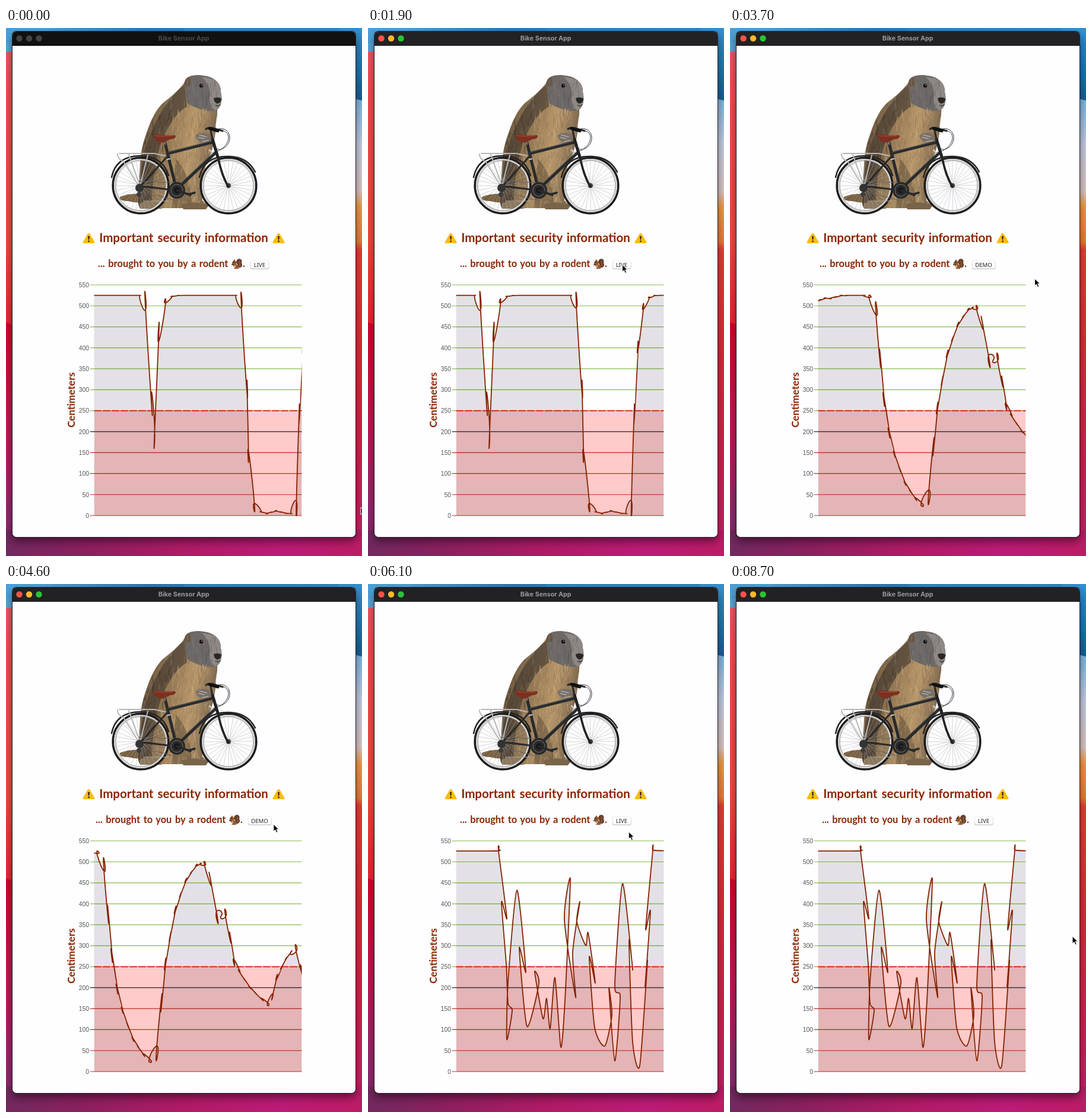
An HTML page that plays this animation: 600 px wide and 888 px high, repeating every 8800 ms.

```html
<!DOCTYPE html>
<html lang="en">
<head>
<meta charset="utf-8">
<title>Bike Sensor App</title>
<style>
html, body { margin: 0; width: 100%; height: 100%; overflow: hidden; background: #b21c63; }
svg { display: block; width: 100vw; height: 100vh; }
.head { font-family: Lato, sans-serif; font-weight: 700; fill: #8b2500; word-spacing: .1em; }
.axis { font: 10.3px "Liberation Sans", Arial, sans-serif; fill: #555; text-anchor: end; }
.bar { font: 700 10.7px Inter, sans-serif; text-anchor: middle; }
.btn { font: 9.6px "Noto Sans", sans-serif; text-anchor: middle; }
.ln { fill: none; stroke-linecap: round; stroke-linejoin: round; }
</style>
</head>
<body>
<svg id="stage" viewBox="0 0 600 888" preserveAspectRatio="none" xmlns="http://www.w3.org/2000/svg"></svg>
<script>
const LOOP = 8800, LEFT = 149, RIGHT = 498, BASE = 820, CM = 388 / 550, STEP = 9;
const yOf = cm => BASE - cm * CM;
const parse = s => s.trim().split(/\s+/).map(p => p.split(',').map(Number));

let seed = 7;
const rnd = () => (seed = seed * 16807 % 2147483647) / 2147483647;

// Spline with tangent factor k; a negative k makes the line loop back at each point
function spline(pts, k) {
  const tan = i => {
    const a = pts[Math.max(0, i - 1)], b = pts[Math.min(pts.length - 1, i + 1)];
    return [(b[0] - a[0]) * k, (b[1] - a[1]) * k];
  };
  const f = v => v.toFixed(1);
  let d = `M${f(pts[0][0])} ${f(pts[0][1])}`;
  for (let i = 1; i < pts.length; i++) {
    const [p, q, a, b] = [pts[i - 1], pts[i], tan(i - 1), tan(i)];
    d += `C${f(p[0] + a[0])} ${f(p[1] + a[1])} ${f(q[0] - b[0])} ${f(q[1] - b[1])} ${f(q[0])} ${f(q[1])}`;
  }
  return d;
}

function curve(pts, k) {
  const line = spline(pts, k);
  return { line, area: `${line}V${BASE}H${pts[0][0]}Z` };
}

// Readings as x, centimetres; wide gaps are filled at the sensor's pace
function readings(s, k) {
  const knots = parse(s), out = [knots[0]];
  for (let i = 1; i < knots.length; i++) {
    const [a, b] = [knots[i - 1], knots[i]], n = Math.max(1, Math.round((b[0] - a[0]) / STEP));
    for (let j = 1; j <= n; j++) out.push([a[0] + (b[0] - a[0]) * j / n, a[1] + (b[1] - a[1]) * j / n]);
  }
  return curve(out.map(([x, v]) => [x, yOf(v)]), k);
}

const live = readings(`100,525 235,525 246,255 250,165 257,445 268,515 279,523 290,525 397,525 407,300
  408,140 418,13 440,4 455,12 472,5 490,4 494,245 500,405 509,502 519,521 528,525 620,525`, -.3);

const demo = readings(`61,240 79,375 97,443 115,480 133,500 151,514 160,519 169,517 187,525 236,525
  247,500 253,375 259,275 268,195 277,145 295,76 313,39 324,22 336,35 343,165 349,258 366,387 384,457
  402,493 416,500 425,463 437,358 451,385 459,320 465,258 492,200 523,157 530,176 537,226 553,270
  570,301 588,185 617,126 638,258 652,180 669,140`, -.45);

// The ride shown at rest, in stage pixels
const still = curve(parse(`100,449 215,449 220,446 221,442 220,449 234,562 225,535 233,640 236,705 243,717
  234,766 236,670 251,515 266,652 255,612 268,744 288,672 281,653 295,731 301,697 307,748 315,662 325,779
  332,700 341,497 331,565 350,695 345,620 357,535 352,568 367,608 371,587 383,671 373,627 382,746 399,777
  411,725 406,680 416,802 425,694 416,675 429,504 446,648 440,600 446,770 458,810 471,635 467,677
  476,550 468,580 480,448 480,442 483,448 530,449`), .12);

const el = (tag, attrs, body = '') =>
  `<${tag} ${Object.entries(attrs).map(([k, v]) => `${k}="${v}"`).join(' ')}>${body}</${tag}>`;
const shape = (d, fill, more = {}) => el('path', { d, fill, ...more });
const line = (d, stroke, w, more = {}) => el('path', { d, stroke, 'stroke-width': w, class: 'ln', ...more });
const disc = (cx, cy, r, fill) => el('circle', { cx, cy, r, fill });
const ring = (cx, cy, r, stroke, w) => el('circle', { cx, cy, r, stroke, 'stroke-width': w, fill: 'none' });
const rect = (x, y, width, height, fill, more = {}) => el('rect', { x, y, width, height, fill, ...more });
const text = (x, y, cls, body, more = {}) => el('text', { x, y, class: cls, ...more }, body);
const grad = (id, dir, stops) => el('linearGradient', { id, ...dir },
  stops.map(([offset, c]) => el('stop', { offset, 'stop-color': c })).join(''));
const DOWN = { x1: 0, y1: 0, x2: 0, y2: 1 }, ACROSS = { x1: 0, y1: 0, x2: 1, y2: 0 };

const bodyD = `M301 91C303 79 321 77 338 81C353 84 363 95 362 108C365 119 363 132 356 137C357 151 352 160 354 172
  C350 190 349 208 340 222C332 240 330 270 331 290L341 299Q337 306 310 303L226 303Q220 296 224 270
  C226 235 225 212 233 188C241 163 250 138 267 124C281 113 292 104 301 91Z`;

function wallpaper() {
  return rect(0, 0, 600, 888, 'url(#left)') +
    rect(0, 0, 600, 40, 'url(#top)') +
    shape('M0 0H80L0 26Z', '#4b9fd6') +
    rect(300, 0, 300, 888, 'url(#right)') +
    shape('M560 0H600V122L560 112Z', 'url(#blue)') +
    shape('M0 495L40 510V888H0Z', 'url(#low)') +
    rect(0, 845, 600, 43, 'url(#foot)');
}

function fur() {
  let out = '';
  for (let i = 0; i < 620; i++) {
    const x = 218 + rnd() * 140, y = 82 + rnd() * 220, len = 4 + rnd() * 9, lean = (rnd() - .6) * 5;
    const back = x < 292 - (y - 110) * .3;
    const tones = y < 130 ? ['#4a494a', '#858381', '#625e5b'] :
      back ? ['#3e342b', '#80705a', '#25201d'] : ['#c4a77c', '#79634a', '#e0c99e'];
    out += line(`M${x.toFixed(1)} ${y.toFixed(1)}l${lean.toFixed(1)} ${len.toFixed(1)}`,
      tones[i % 3], .8, { opacity: .55 });
  }
  return out;
}

function marmot() {
  return shape('M232 279Q205 278 192 284Q190 291 205 291Q220 295 235 293Z', '#78603f') +
    shape(bodyD, 'url(#coat)') +
    el('g', { 'clip-path': 'url(#body)' },
      shape('M301 95Q264 125 243 180Q225 225 222 303H245Q246 240 262 190Q282 145 305 132Z', '#443a31', { opacity: .65 }) +
      shape('M298 78H370V138Q332 144 305 126Z', '#6c6967') +
      shape('M330 82Q345 98 344 113Q340 125 352 139L370 130V90Z', '#8e8984') +
      shape('M303 84Q312 79 311 96Q305 100 300 96Z', '#6b5540') +
      shape('M286 220Q312 245 313 303H280Z', '#4d3e2f', { opacity: .45 }) + fur()) +
    disc(329, 97, 3.2, '#171413') + disc(330, 96, .8, '#ddd') +
    shape('M350 118Q359 115 363 119Q363 126 356 127Q351 126 350 118Z', '#292626') +
    line('M353 130Q358 132 361 129', '#3c3431', 1.2) +
    shape('M319 181Q327 174 341 178L345 184Q341 194 329 192Q320 188 319 181Z', '#77706a') +
    line('M324 184l10 2M326 180l12 3M331 191l10-2', '#b6aba0', 1.5) +
    shape('M225 296Q238 286 259 298L263 304H226Z', '#8c785c') +
    shape('M295 297Q320 289 341 299L337 305H299Z', '#796449');
}

function wheel(cx) {
  let spokes = '';
  for (let i = 0; i < 32; i++) {
    const a = i * Math.PI / 16, b = a + (i % 2 ? .16 : -.16);
    spokes += `M${cx + 4 * Math.cos(b)} ${265 + 4 * Math.sin(b)}L${cx + 43 * Math.cos(a)} ${265 + 43 * Math.sin(a)}`;
  }
  return line(spokes, '#aaa', .5) + ring(cx, 265, 46.8, '#1d1c1c', 3.6) +
    ring(cx, 265, 43.7, '#d3d3d3', 2.5) + ring(cx, 265, 42, '#77736f', .7) + disc(cx, 265, 4, '#444');
}

function bike() {
  return wheel(227) + wheel(375) +
    line('M178 251Q185 216 225 215Q264 215 274 248M326 251Q334 214 377 216Q407 217 420 242', '#252424', 2.5) +
    line('M191 211H250M188 212Q187 219 199 226L224 266M207 213L225 263M239 214L226 265M250 211L268 215', '#b7b7b5', 2) +
    line('M227 266L287 273M227 266L271 217', '#292929', 3) +
    line('M268 193L287 271M272 211L348 192M288 271L354 209', '#292b2c', 5) +
    line('M273 209L348 190M290 265L350 208', '#606466', .8) +
    line('M348 187L357 217', '#202122', 5) + line('M357 215Q363 248 375 267', '#222324', 3.7) +
    line('M348 187L345 173M337 170Q343 165 354 170L365 173', '#282828', 3.2) +
    line('M343 169L357 173', '#111', 5) +
    line('M356 170C379 164 384 192 367 202C358 207 354 203 351 198M361 172C384 173 376 201 356 207', '#363839', 1) +
    line('M265 185L268 195', '#777', 3) +
    shape('M248 181Q251 177 261 180Q275 181 285 180Q289 186 277 187L264 193Q250 191 248 181Z', '#7c3020') +
    line('M251 181Q262 183 281 181', '#a9503a', 1) +
    line('M272 221l4-1M343 205l4 4', '#cfcfcf', 2) +
    line('M224 258L289 260M223 274L286 290', '#66625e', 1) +
    disc(225, 269, 7, '#333') + disc(224, 280, 4, '#3d3d3d') +
    disc(288, 273, 14, '#292929') + ring(288, 273, 10, '#777', 1) + disc(288, 273, 5, '#171717') +
    line('M288 273L311 281M307 280L318 277', '#28292a', 3.5) + line('M232 291L274 291', '#aaa', 1);
}

const warning = x => el('g', { transform: `translate(${x} 344)` },
  shape('M10.5 1Q12 1 13 3L20.5 16Q21 18 18.5 18H2.5Q0 18 .6 16L8 3Q9 1 10.5 1Z', '#fbbc16') +
  shape('M9 6H12L11.4 12H9.6Z', '#3a2a17') + disc(10.5, 14.7, 1.4, '#3a2a17'));

const squirrel = el('g', { transform: 'translate(379 387)' },
  shape('M10 16Q13 11 9 8Q9 1 15 1Q20 3 18 8Q21 13 16 16Z', '#68402b') +
  shape('M14 4Q18 6 15 9Q18 13 14 15', '#8c5a38') +
  shape('M6 2L8 5Q11 7 9 10Q14 13 13 18H5L7 15Q3 14 4 11Q0 9 3 6Z', '#925b35') +
  shape('M5 11Q9 11 8 16Q5 15 5 11Z', '#d6a269') + disc(4.8, 7, .9, '#201510') +
  line('M2 11H5', '#6c3f24', 2));

function chart() {
  let grid = '', labels = '';
  for (let v = 0; v <= 550; v += 50) {
    const y = yOf(v);
    grid += line(`M142 ${y}H${RIGHT}`, v > 200 ? '#86bd48' : v === 200 ? '#252020' : '#c62a24', 1.2);
    labels += text(140, y + 3.8, 'axis', v);
  }
  return rect(LEFT, yOf(250), RIGHT - LEFT, 250 * CM, '#ffcaca') + grid + labels +
    el('g', { 'clip-path': 'url(#plot)' },
      el('path', { id: 'area', fill: '#0b0518', 'fill-opacity': .11 }) +
      line(`M${LEFT} ${yOf(250)}H${RIGHT}`, '#dc160c', 1.8, { 'stroke-dasharray': '11 4' }) +
      el('path', { id: 'line', class: 'ln', stroke: '#842300', 'stroke-width': 1.8 })) +
    text(0, 0, 'head', 'Centimeters', { transform: 'translate(115.5 625.5) rotate(-90)', 'font-size': 17, 'text-anchor': 'middle' });
}

const svg = document.getElementById('stage');
svg.innerHTML = el('defs', {},
  grad('left', DOWN, [[0, '#3f8fca'], [.025, '#e75d68'], [.12, '#f44c52'], [.4, '#ee4c3d'], [.56, '#ea2734'], [1, '#7b2367']]) +
  grad('low', DOWN, [[0, '#d5072b'], [.45, '#bd1b54'], [.85, '#8f2b72'], [1, '#722362']]) +
  grad('top', ACROSS, [[0, '#58a7d9'], [.4, '#2b78b5'], [1, '#298dc9']]) +
  grad('right', DOWN, [[0, '#2b84bf'], [.13, '#78b4e0'], [.22, '#c0cbe2'], [.31, '#d9c5c2'], [.34, '#ef9b3f'],
    [.405, '#f07a35'], [.42, '#e63e35'], [.6, '#dc2d37'], [.82, '#d12150'], [1, '#c3206d']]) +
  grad('blue', DOWN, [[0, '#348fce'], [.6, '#1777b0'], [1, '#155e95']]) +
  grad('foot', ACROSS, [[0, '#71295f'], [.22, '#8c205f'], [.5, '#b01b66'], [.78, '#bc1b77'], [1, '#bc1c65']]) +
  grad('coat', { x1: 0, y1: 0, x2: 1, y2: .25 }, [[0, '#574737'], [.42, '#907552'], [.72, '#b8976a'], [1, '#79644d']]) +
  el('clipPath', { id: 'body' }, shape(bodyD, '#000')) +
  el('clipPath', { id: 'plot' }, rect(LEFT - .5, 425, RIGHT - LEFT + 1, BASE - 424, '#000')) +
  el('filter', { id: 'shade', x: '-10%', y: '-10%', width: '120%', height: '120%' }, el('feGaussianBlur', { stdDeviation: 7 }))
) + wallpaper() +
  rect(10, 14, 580, 850, '#19050f', { rx: 9, opacity: .5, filter: 'url(#shade)' }) +
  rect(10, 5, 580, 852, '#27202a', { rx: 7 }) + rect(11, 6, 578, 850, '#fefdff', { rx: 6.5 }) +
  el('path', { id: 'bar', d: 'M11 30V13Q11 6 18 6H582Q589 6 589 13V30Z' }) +
  [22.5, 39, 55.5].map((cx, i) => el('circle', { id: 'dot' + i, cx, cy: 17.5, r: 5.2 })).join('') +
  text(299.7, 21, 'bar', 'Bike Sensor App', { id: 'title' }) +
  marmot() + bike() + warning(129) + warning(449) +
  text(299.5, 360, 'head', 'Important security information', { 'font-size': 20.5, 'text-anchor': 'middle' }) +
  el('g', { id: 'sub' }, text(155, 402, 'head', '... brought to you by a rodent', { 'font-size': 16.4 }) +
    squirrel + text(399, 402, 'head', '.', { 'font-size': 16.4 })) +
  el('rect', { id: 'shadow', y: 391.5, height: 14, rx: 3.5, fill: '#aaa' }) +
  el('rect', { id: 'btn', y: 391, height: 13.5, rx: 3.5 }) + text(427.5, 401.7, 'btn', '', { id: 'label' }) +
  chart() +
  shape('M0 0V12.2L2.9 9.5L4.9 14.2L7.2 13.2L5.2 8.7H9Z', '#080808', { id: 'cursor', stroke: '#fff', 'stroke-width': 1 });

const $ = id => document.getElementById(id);
const set = (id, attrs) => { for (const k in attrs) $(id).setAttribute(k, attrs[k]); };

// Pointer stops: time, x, y
const stops = parse(`0,598,806 200,598,806 900,435,396 1300,435,396 1900,428.5,398 2800,428.5,398 3500,513.5,421.5
  4000,513.5,421.5 4900,429,398 5700,429,398 6500,449.5,435.5 7200,449.5,435.5 8200,577,592.5 8800,577,592.5`);

function pointer(t) {
  const i = stops.findIndex(s => s[0] > t), [a, b] = [stops[i - 1], stops[i]];
  const p = (t - a[0]) / (b[0] - a[0]), e = p * p * (3 - 2 * p);
  return [a[1] + (b[1] - a[1]) * e, a[2] + (b[2] - a[2]) * e];
}

function plot(t) {
  if (t >= 5600) return [still, 0];
  if (t >= 2800) return [demo, (3700 - t) / 100 * STEP];
  return [live, -9.1 * Math.floor(t / 335)];
}

function draw(time) {
  const t = Math.floor(time % LOOP / 100) * 100;
  const focus = t >= 1400, isDemo = t >= 2700 && t < 5600;
  const pressed = t >= 2500 && t < 2700 || t === 5500;

  set('bar', { fill: focus ? '#222123' : '#111' });
  set('title', { fill: focus ? '#9b999c' : '#4b4a4b' });
  ['#ff5148', '#f9b92b', '#28c536'].forEach((c, i) => set('dot' + i, { fill: focus ? c : '#444345' }));

  const w = isDemo ? 39 : 31, x = 427.7 - w / 2;
  set('sub', { transform: `translate(${isDemo ? -4 : 0} 0)` });
  set('shadow', { x: x - .3, width: w + .6 });
  set('btn', { x, width: w, fill: pressed ? '#c9321f' : '#fff', stroke: pressed ? '#eda01b' : '#e3e1e4',
    'stroke-width': pressed ? 1.5 : .6, 'stroke-dasharray': pressed ? '1.5 1' : 'none' });
  set('label', { fill: pressed ? '#ffe4a8' : '#222' });
  $('label').textContent = isDemo ? 'DEMO' : 'LIVE';

  const [c, dx] = plot(t), transform = `translate(${dx.toFixed(2)} 0)`;
  set('area', { d: c.area, transform });
  set('line', { d: c.line, transform });
  set('cursor', { transform: `translate(${pointer(t).map(v => v.toFixed(1)).join(' ')})` });
}

const start = performance.now();
function tick() {
  draw(performance.now() - start);
  requestAnimationFrame(tick);
}
tick();
</script>
</body>
</html>
```
